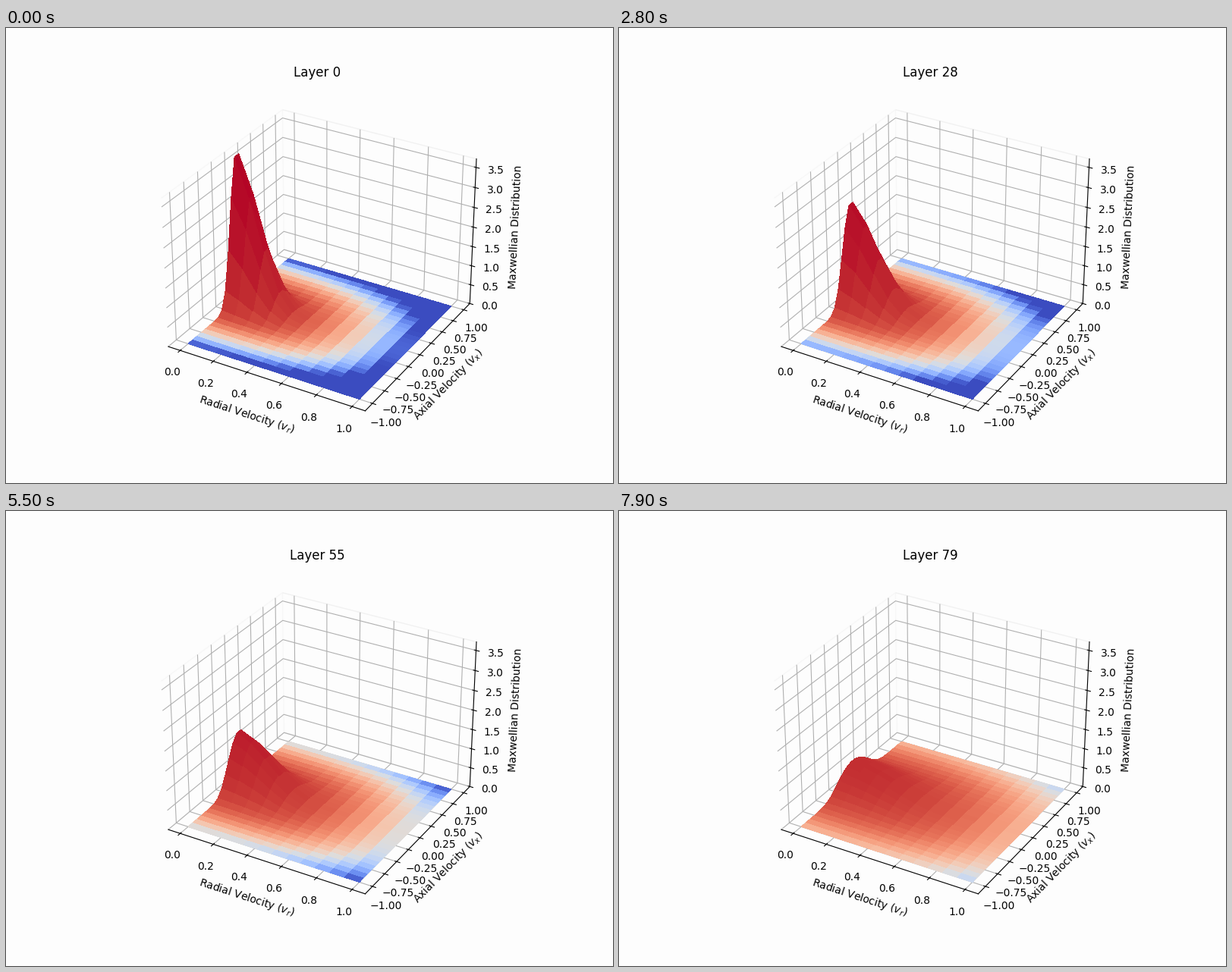
A matplotlib script that plays this animation: 800x600 px, repeating every 8000 ms.

```python
import numpy as np
import matplotlib.pyplot as plt
from matplotlib.animation import FuncAnimation
from matplotlib.colors import LogNorm

LAYERS = 80
PEAK = 3.71
BG = "#fdfdfd"

# Temperature relative to the coldest layer.
KNOTS = [0, 13, 18, 28, 36, 45, 55, 63, 79]
TEMPS = [1, 1, 1.007, 1.337, 1.83, 1.99, 2.064, 2.385, 3.68]

# Velocity levels grow quadratically but are shown evenly spaced.
NV = 13
steps = np.arange(1, NV + 1)
speed = steps + 0.1 * steps**2
energy_r = 0.063 * speed**2
energy_x = np.concatenate([energy_r[::-1], energy_r])
VR, VX = np.meshgrid(np.linspace(0, 1, NV), np.linspace(-1, 1, 2 * NV))
ENERGY = energy_r[None, :] + energy_x[:, None]
norm = LogNorm(vmin=1e-20, vmax=PEAK)


def maxwellian(layer):
    temp = np.interp(layer, KNOTS, TEMPS)
    return PEAK * temp**-1.5 * np.exp(ENERGY.min() - ENERGY / temp)


def padded(lo, hi):
    pad = (hi - lo) * 0.05
    lo, hi = lo - pad, hi + pad
    edge = (hi - lo) / 48
    return lo - edge, hi + edge


fig = plt.figure(figsize=(8, 6), dpi=100, facecolor=BG)
ax = fig.add_subplot(111, projection="3d", facecolor=BG)
ax.set_xlim(*padded(0, 1))
ax.set_ylim(*padded(-1, 1))
ax.set_zlim(0, PEAK)
ax.set_xlabel("Radial Velocity ($v_r$)")
ax.set_ylabel("Axial Velocity ($v_x$)")
ax.set_zlabel("Maxwellian Distribution")
for axis in (ax.xaxis, ax.yaxis, ax.zaxis):
    axis.pane.fill = False

surface = None


def draw(layer):
    global surface
    if surface is not None:
        surface.remove()
    surface = ax.plot_surface(VR, VX, maxwellian(layer), cmap="coolwarm",
                              norm=norm, linewidth=0, antialiased=False)
    ax.set_title(f"Layer {layer}")
    return [surface]


anim = FuncAnimation(fig, draw, frames=LAYERS, init_func=lambda: [],
                     interval=100, repeat=True, repeat_delay=0)
plt.show()
```
